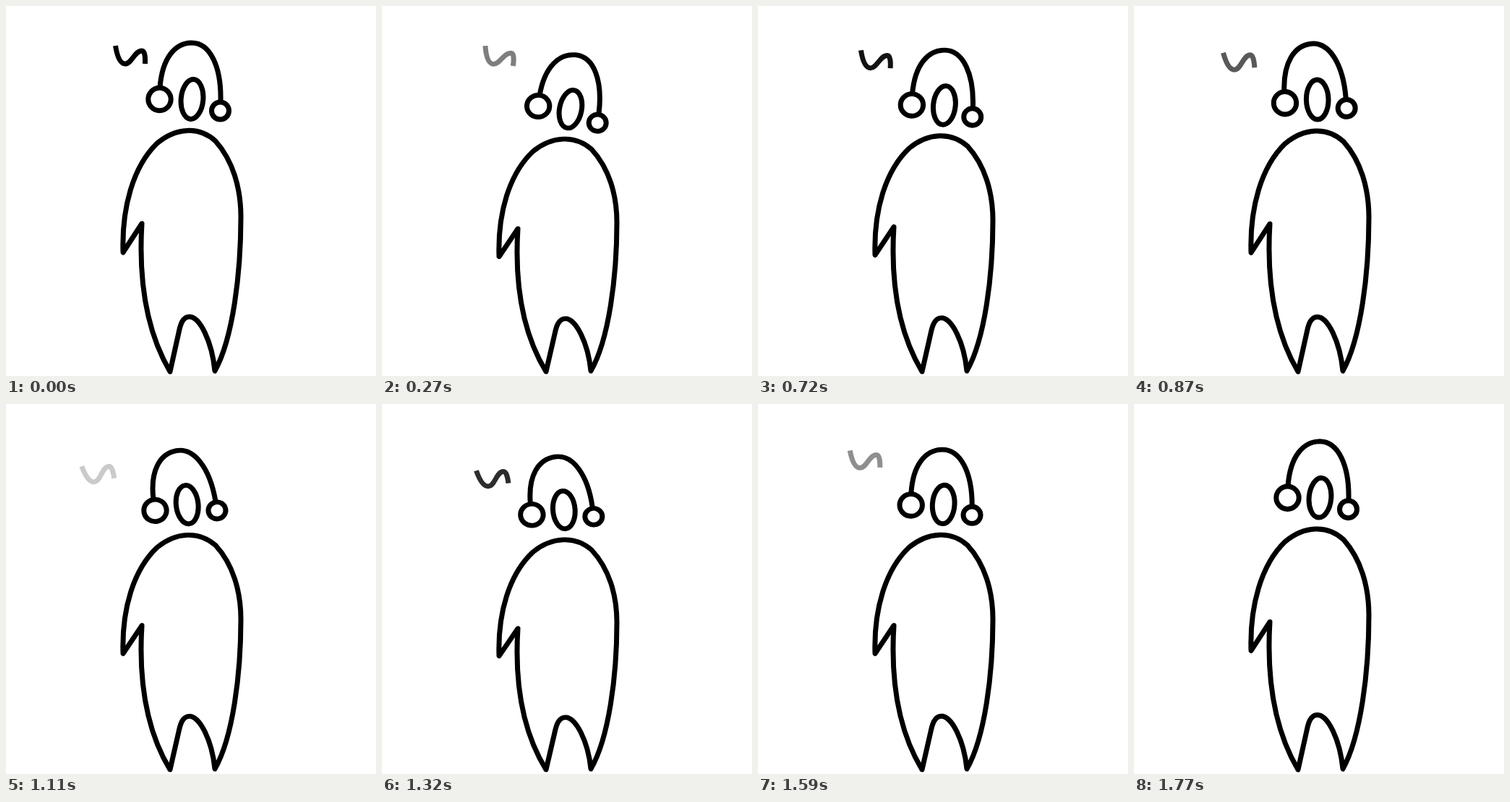
These frames come from a looping animation (512 px wide and 512 px high, 1.8 s). An HTML page:

```html
<!DOCTYPE html>
<html lang="en">
<head>
<meta charset="utf-8">
<title>Breathing figure</title>
<style>
  html, body { margin: 0; width: 100%; height: 100%; overflow: hidden; background: #fff; }
  svg { display: block; width: 100vw; height: 100vh; }
  g { fill: none; stroke: #000; stroke-width: 7; stroke-linejoin: round; }
</style>
</head>
<body>
<svg viewBox="0 0 512 512">
  <g id="figure">
    <path d="M188 301L162 341C160 279 176 222 209 190C235 168 267 166 290 187C314 214 325 252 325 292C325 370 314 460 289 505C285 464 268 430 254 430C244 430 241 442 239 452L227 506C197 455 183 385 188 301Z"/>
    <g id="head">
      <path d="M213 113C216 72 234 51 257 51C283 51 298 85 297 131"/>
      <circle cx="212.5" cy="129" r="15.7"/>
      <circle cx="296.5" cy="145" r="12"/>
      <ellipse cx="257.5" cy="129" rx="15.3" ry="27.5" transform="rotate(5 257.5 129)"/>
      <path id="puff" d="M151.5 55C154 70 158 80 165 80C174 80 178 62 188 62C192 62 193 70 192.5 80"/>
    </g>
  </g>
</svg>
<script>
const LOOP = 1800;
const GROUND = 506;
const [figure, head, puff] = ['figure', 'head', 'puff'].map(id => document.getElementById(id));

// [time, head tilt in degrees]
const tilts = [[0, 0], [440, 8.1], [1090, -10.8], [1170, -11], [1710, 0], [LOOP, 0]];
// [start, end, fades in]
const puffs = [[0, 430, false], [480, 1225, true], [1242, 1755, true]];

const clamp = x => Math.max(0, Math.min(1, x));
const smooth = x => x * x * (3 - 2 * x);
const sineEase = x => (1 - Math.cos(Math.PI * x)) / 2;

function tiltAt(t) {
  const i = tilts.findIndex(([time]) => time > t);
  const [t0, a] = tilts[i - 1], [t1, b] = tilts[i];
  return a + (b - a) * sineEase((t - t0) / (t1 - t0));
}

function drawPuff(t) {
  const active = puffs.find(([start, end]) => t >= start && t < end);
  if (!active) return puff.setAttribute('opacity', 0);
  const [start, end, fadesIn] = active;
  const p = (t - start) / (end - start);
  const fadeIn = fadesIn ? smooth(clamp(p / 0.21)) : 1;
  puff.setAttribute('opacity', fadeIn * clamp((1 - p) / 0.73));
  puff.setAttribute('transform', `translate(${-32 * p} ${-8 * p})`);
}

function draw() {
  const t = performance.now() % LOOP;
  const squash = 1 - 0.047 * Math.abs(Math.sin(Math.PI * t / 900)) ** 1.4;
  figure.setAttribute('transform', `translate(0 ${GROUND * (1 - squash)}) scale(1 ${squash})`);
  head.setAttribute('transform', `rotate(${tiltAt(t)} 254 165)`);
  drawPuff(t);
  requestAnimationFrame(draw);
}
draw();
</script>
</body>
</html>
```
